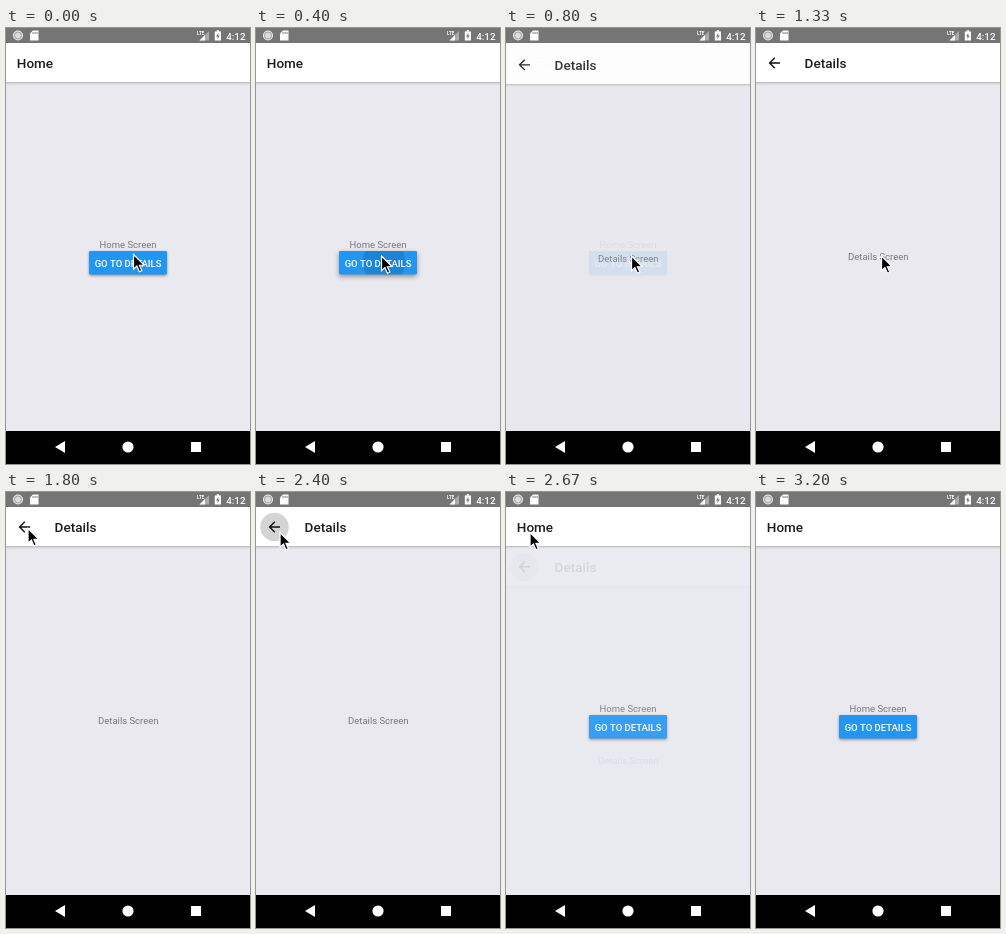
These frames come from a looping animation (244 by 436 pixels, 3790 ms). An HTML page with a canvas:

```html
<!DOCTYPE html>
<html lang="en">
<head>
<meta charset="utf-8">
<title>Screen transition</title>
<style>
html, body { margin: 0; width: 100%; height: 100%; overflow: hidden; background: #000; }
canvas { display: block; width: 244px; height: 436px; }
</style>
</head>
<body>
<canvas id="stage" width="244" height="436"></canvas>
<script>
const ctx = document.getElementById('stage').getContext('2d');
const W = 244, LOOP = 3790, FPS = 15;
const TOP = 15, HEADER_H = 39, NAV = 403;
const BG = '#e9e9ef', BLUE = '#2196f3';

const clamp = v => Math.min(1, Math.max(0, v));
const mix = (a, b, k) => a + (b - a) * k;
const smooth = k => k * k * (3 - 2 * k);
const easeOut = k => 1 - (1 - k) ** 4;

function rect(x, y, w, h, color) {
  ctx.fillStyle = color;
  ctx.fillRect(x, y, w, h);
}
function disc(x, y, r, color) {
  ctx.fillStyle = color;
  ctx.beginPath();
  ctx.arc(x, y, r, 0, 7);
  ctx.fill();
}
function poly(points, color) {
  ctx.fillStyle = color;
  ctx.beginPath();
  points.forEach(([x, y]) => ctx.lineTo(x, y));
  ctx.closePath();
  ctx.fill();
}
function label(text, x, y, size, color, weight = 400, align = 'left') {
  ctx.font = `${weight} ${size}px Roboto, sans-serif`;
  ctx.textAlign = align;
  ctx.fillStyle = color;
  ctx.fillText(text, x, y);
}

function statusBar() {
  rect(0, 0, W, TOP, '#757575');
  disc(12, 7.5, 5, '#eee');
  disc(12, 7.5, 4, '#aaa');
  disc(12, 7.5, 2.8, '#ddd');
  poly([[27, 2.5], [32.5, 2.5], [32.5, 12.5], [24, 12.5], [24, 5.5]], '#fff');
  for (const x of [27, 29, 31]) rect(x - 0.4, 4, 0.9, 2, '#757575');
  label('LTE', 191, 6.5, 4.6, '#fff', 700);
  poly([[203, 3], [203, 12.5], [193.5, 12.5]], '#aaa');
  poly([[199, 7], [199, 12.5], [193.5, 12.5]], '#fff');
  rect(208.8, 3.5, 6.2, 9, '#fff');
  rect(210.6, 2.3, 2.6, 1.5, '#fff');
  poly([[212.5, 4.8], [210, 8.5], [211.6, 8.5], [211.3, 11.3], [213.8, 7.5], [212.2, 7.5]], '#757575');
  label('4:12', 239.5, 11.5, 9.8, '#fff', 500, 'right');
}

function navBar() {
  rect(0, NAV, W, 436 - NAV, '#000');
  poly([[49, 419], [59, 413], [59, 425]], '#fff');
  disc(122, 419, 5.6, '#fff');
  rect(185, 414, 10, 10, '#fff');
}

function header(title, x) {
  const bottom = TOP + HEADER_H;
  rect(0, bottom, W, 1, 'rgba(0,0,0,.17)');
  rect(0, bottom + 1, W, 1, 'rgba(0,0,0,.09)');
  rect(0, bottom + 2, W, 1, 'rgba(0,0,0,.03)');
  rect(0, TOP, W, HEADER_H, '#fff');
  label(title, x, 40, 13.5, '#1c1c1e', 500);
}

function button(press, fade) {
  ctx.save();
  ctx.shadowColor = 'rgba(0,0,0,.4)';
  ctx.shadowBlur = mix(3, 6, press);
  ctx.shadowOffsetY = mix(1.2, 2.5, press);
  ctx.fillStyle = BLUE;
  ctx.beginPath();
  ctx.roundRect(83, 223, 78, 23.5, 1.4);
  ctx.fill();
  ctx.shadowColor = 'transparent';
  if (press > 0) {
    ctx.clip();
    disc(128, 234, 32 * press, `rgba(0,0,0,${0.13 * fade})`);
  }
  ctx.restore();
  label('GO TO DETAILS', 122, 238.6, 9.5, '#fff', 500, 'center');
}

function homeScreen(t) {
  rect(0, TOP, W, NAV - TOP, BG);
  header('Home', 10.8);
  label('Home Screen', 122, 220, 9.5, '#79797c', 400, 'center');
  const press = t < 330 || t >= 670 ? 0 : clamp((t - 260) / 210);
  button(press, 1 - clamp((t - 470) / 130));
}

function backArrow() {
  ctx.strokeStyle = '#111';
  ctx.lineWidth = 1.4;
  ctx.beginPath();
  ctx.moveTo(24, 35);
  ctx.lineTo(13.8, 35);
  ctx.moveTo(18.8, 29.8);
  ctx.lineTo(13.6, 35);
  ctx.lineTo(18.8, 40.2);
  ctx.stroke();
}

// Every layer of the card fades on its own, so layers below show through.
function detailsScreen(t, p) {
  const alpha = p < 0.5 ? p / 2
    : p < 0.9 ? mix(0.25, 0.7, (p - 0.5) / 0.4)
    : mix(0.7, 1, (p - 0.9) / 0.1);
  ctx.save();
  ctx.beginPath();
  ctx.rect(0, TOP, W, NAV - TOP);
  ctx.clip();
  ctx.globalAlpha = alpha;
  ctx.translate(0, 50 * (1 - p));
  rect(0, TOP, W, NAV - TOP, BG);
  label('Details Screen', 122.3, 232, 9.5, '#79797c', 400, 'center');
  header('Details', 48.6);
  if (t >= 2200) {
    const grow = smooth(clamp((t - 2130) / 200));
    disc(18.5, 35, 14.3 * grow, 'rgba(0,0,0,.17)');
  }
  if (t >= 730) backArrow();
  ctx.restore();
}

// Share of the details card that has arrived: 0 hidden, 1 in place.
function progress(t) {
  if (t < 670 || t >= 3000) return 0;
  if (t < 2500) return easeOut(clamp((t - 520) / 500));
  return 1 - easeOut(clamp((Math.min(t, 2730) - 2506) / 500));
}

const MOVES = [
  [0, 130, 125, 227.5],
  [1330, 1800, 21.5, 36],
  [1800, 2000, 23.5, 40]
];
function cursor(t) {
  if (t >= 3200) return;
  let x = 127, y = 226;
  for (const [from, to, tx, ty] of MOVES) {
    const k = smooth(clamp((t - from) / (to - from)));
    x = mix(x, tx, k);
    y = mix(y, ty, k);
  }
  ctx.save();
  ctx.translate(x, y);
  ctx.scale(1.08, 1.08);
  const shape = [[0.5, 0.5], [0.5, 14], [3.6, 11.2], [5.9, 16.5], [8.2, 15.5], [5.9, 10.4], [10.2, 10.2]];
  poly(shape, '#000');
  ctx.strokeStyle = '#fff';
  ctx.lineWidth = 1.1;
  ctx.stroke();
  ctx.restore();
}

function draw(t) {
  const p = progress(t);
  if (p < 1) homeScreen(t);
  if (p > 0) detailsScreen(t, p);
  statusBar();
  navBar();
  cursor(t);
}

const start = performance.now();
function tick() {
  const now = (performance.now() - start) % LOOP;
  const step = Math.floor((now + 3.4) * FPS / 1000);
  draw(Math.round(step * 100 / FPS) * 10);
  requestAnimationFrame(tick);
}
tick();
</script>
</body>
</html>
```
